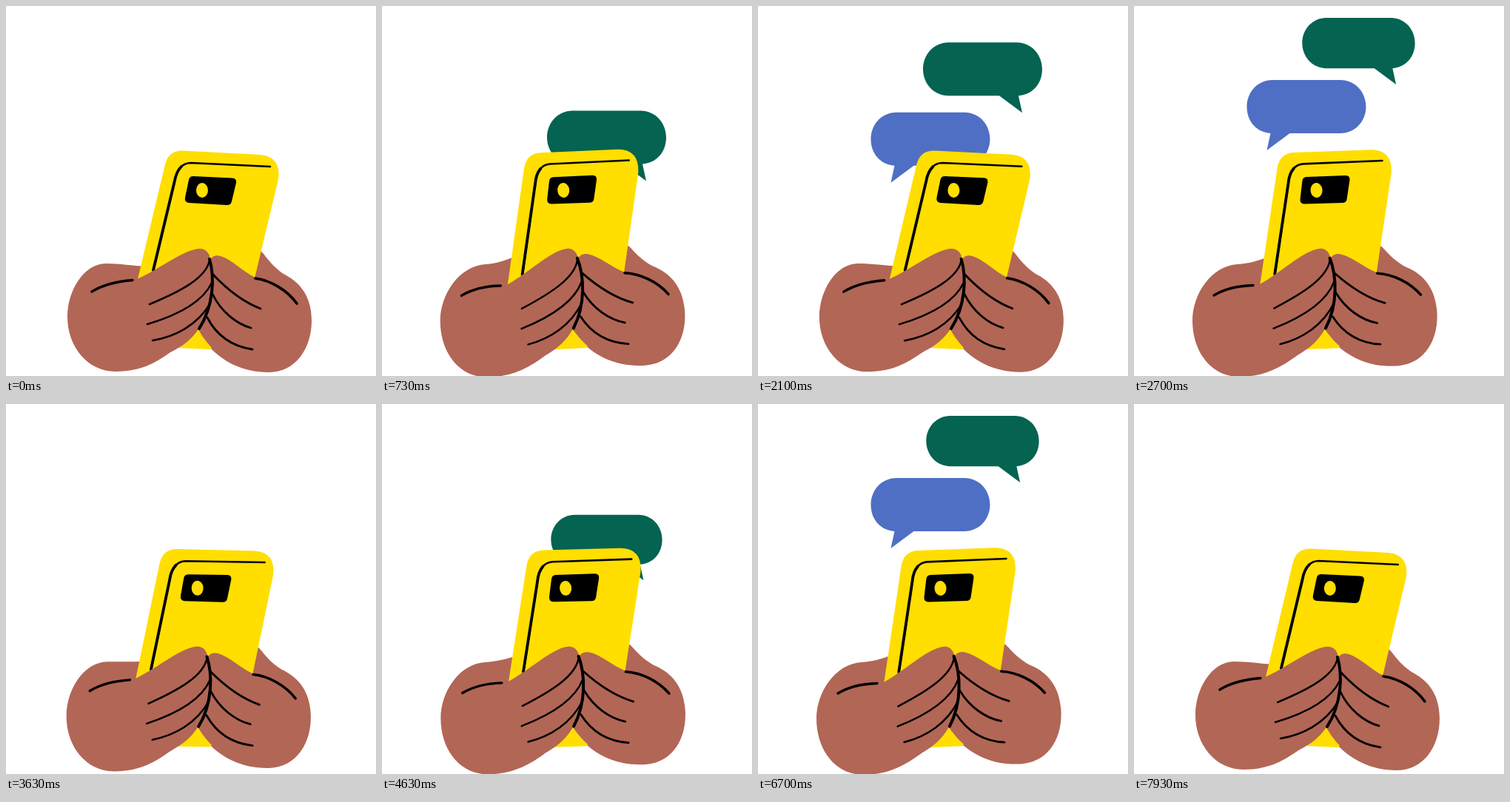
Write an HTML page that moves like this. It is 500 px wide and 500 px high and loops after 8010 ms.

```html
<!DOCTYPE html>
<html lang="en">
<head>
<meta charset="utf-8">
<title>Texting hands</title>
<style>
  html, body { margin: 0; height: 100%; overflow: hidden; background: #fff; }
  svg { display: block; width: 100%; height: 100%; }
  .skin { fill: #b26656; }
  .ink { fill: none; stroke: #000; stroke-width: 3; stroke-linecap: round; stroke-linejoin: round; }
</style>
</head>
<body>
<svg viewBox="0 0 500 500">
  <defs>
    <!-- bubble centred on its full height, tail included -->
    <path id="bubble" d="M-46-47.5H46C66-47.5 80.5-31 80.5-11.5C80.5 8 68 23 48.5 24.5L53.5 47.5L22.5 24.5H-46C-66 24.5-80.5 8-80.5-11.5C-80.5-31-66-47.5-46-47.5Z"/>
  </defs>

  <use id="blue" href="#bubble" fill="#4f6fc4"/>
  <use id="green" href="#bubble" fill="#046351"/>

  <path id="palm" class="skin"/>
  <g id="rock">
    <path class="skin" d="M344 331C350 335 355 348 375 362C395 372 413 390 413 425C413 462 392 495 355 495C320 495 290 480 270 455L320 400Z"/>
    <path fill="#ffde00" d="M178 369L215 214Q220 195 239 195.500L344 201Q372 204 368 234L336 368L325 410L276 464L232 462Z"/>
    <path class="ink" stroke-width="3" d="M199 358L228 236Q233 212 250 212L357 217" style="stroke-width:2.600"/>
    <path class="ink" d="M199 357L228 236Q230 224 237 217" style="stroke-width:3.800"/>
    <path d="M253 230L306 232.500Q312 233 311 239L305 264Q304 269.500 298 269L247 266Q241 265 242 259L247 235Q248 230 253 230Z"/>
    <ellipse cx="265" cy="249" rx="8" ry="10" fill="#ffde00"/>
    <path class="skin" d="M275 345C277 338 284 336 290 338C306 343 320 359 337 367L375 372L390 440L340 493C302 487 275 465 260 437Z"/>
    <path class="skin" d="M172 371C202 360 240 328 262 328C271 328 276 335 276 344C284 370 280 405 260 437C250 451 240 459 222 468L170 472L150 400Z"/>
    <path class="ink" d="M275 342C282 366 281 405 261 436" style="stroke-width:4"/>
    <path class="ink" style="stroke-width:2.500" d="M275 344C270 368 235 386 194 403M278 374C265 402 228 419 191 430M276 402C258 432 228 447 198 452"/>
    <path class="ink" style="stroke-width:2.800" d="M280 363C296 380 318 399 344 409M279 389C290 412 310 429 331 435M272 421C285 446 306 460 333 464"/>
    <path class="ink" style="stroke-width:3.600" d="M337 368C358 371 380 384 393 402"/>
  </g>
  <path id="crease" class="ink" style="stroke-width:3.400"/>
</svg>
<script>
const $ = id => document.getElementById(id);
const LOOP = 8010, CYCLE = 4000;

// the left palm bends as the phone tips: [phone right, phone left]
const bends = {
  palm: [
    "M190 352C170 351 155 348 135 348C105 348 83 385 83 420C83 460 110 494 148 494C185 494 205 480 225 466L240 400Z",
    "M182 339C165 345 155 348 140 349C104 351 79 390 79 425C79 468 105 501 142 501C180 501 204 485 226 468L230 400Z"
  ],
  crease: [
    "M116 386C132 376 152 372 171 370.5",
    "M108 391C123 382 142 378 161 377.5"
  ]
};

function mix([from, to], k) {
  const ends = to.match(/[\d.]+/g);
  let i = 0;
  return from.replace(/[\d.]+/g, n => (+n + (ends[i++] - n) * k).toFixed(2));
}

function smooth(t, start, length) {
  const p = Math.min(1, Math.max(0, (t - start) / length));
  return p * p * (3 - 2 * p);
}

function float(id, t, x, y, rise, mid, grow, shrink, flip) {
  const top = y - rise * Math.sin(Math.PI * (t - mid) / 3700);
  const size = smooth(t, grow, 570) * (1 - smooth(t, shrink, 570));
  $(id).setAttribute("transform", `translate(${x} ${top}) scale(${size * flip} ${size})`);
}

function draw(now) {
  // pictures alternate between 30 and 70 ms on screen
  const ms = now % LOOP;
  const t = (Math.floor(ms / 100) * 100 + (ms % 100 < 30 ? 0 : 50)) % CYCLE;

  const sway = Math.cos(Math.PI * t / 1000);
  $("rock").setAttribute("transform", `rotate(${3.15 * (sway - 1)} 255 460)`);
  for (const id in bends) $(id).setAttribute("d", mix(bends[id], (1 - sway) / 1.588));

  float("green", t, 303.5, 127.5, 87, 1675, 170, 2620, 1);
  float("blue", t, 233, 189, 89, 2130, 640, 3105, -1);
}

const start = performance.now();
(function tick() {
  draw(performance.now() - start);
  requestAnimationFrame(tick);
})();
</script>
</body>
</html>
```
